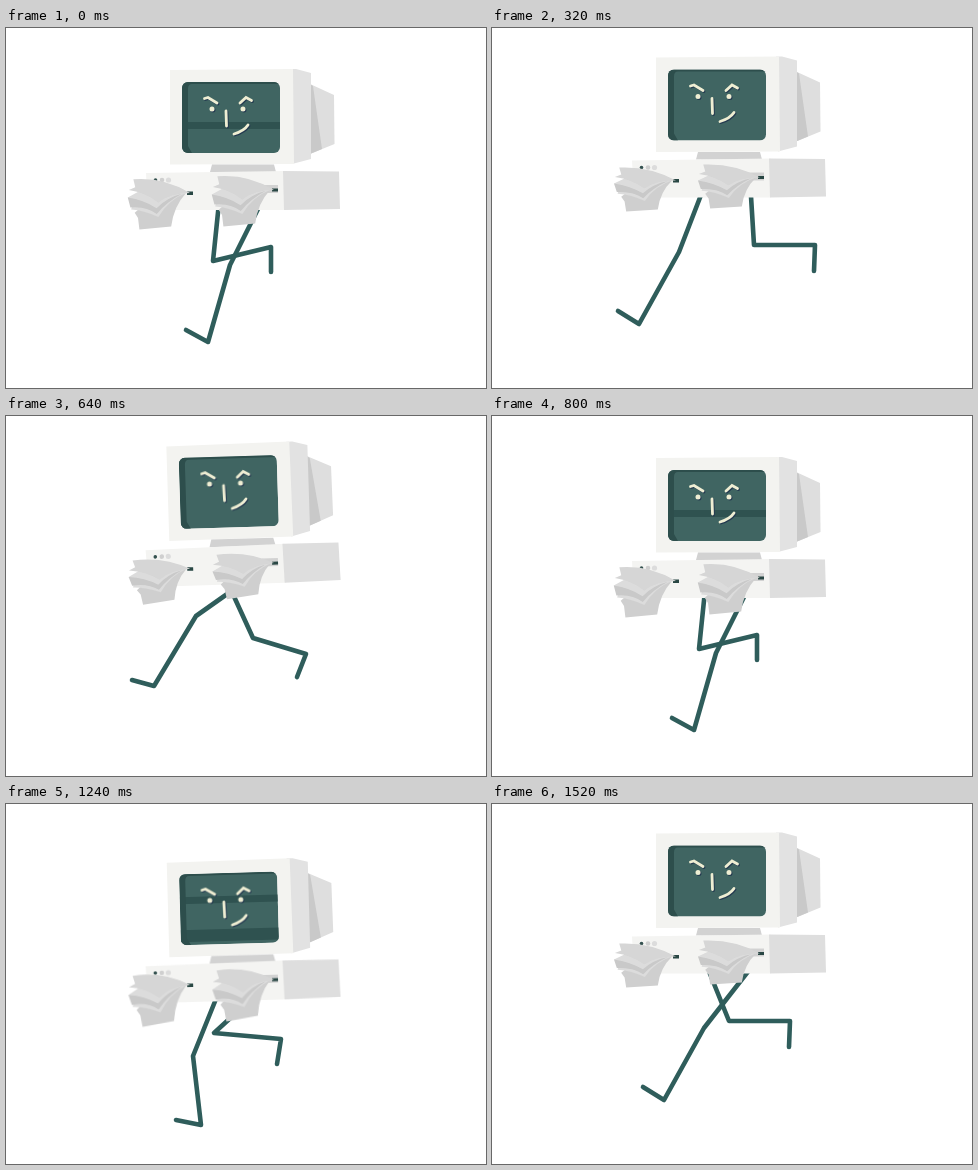
Animation of 480 by 360 pixels, one loop 1560 ms. Source, as an HTML page without scripts:

```html
<!DOCTYPE html>
<html lang="en">
<head>
<meta charset="utf-8">
<title>Running computer</title>
<style>
  @property --lift { syntax: "<length>"; inherits: true; initial-value: 0px; }
  @property --tilt { syntax: "<angle>"; inherits: true; initial-value: 0deg; }
  @property --flap { syntax: "<angle>"; inherits: true; initial-value: 8deg; }
  @property --spread { syntax: "<number>"; inherits: true; initial-value: 1; }
  @property --scan { syntax: "<length>"; inherits: true; initial-value: 0px; }
  @property --glow { syntax: "<number>"; inherits: true; initial-value: 0; }

  html, body { margin: 0; width: 100%; height: 100%; overflow: hidden; background: #fff; }
  svg { display: block; width: 100vw; height: 100vh; }

  /* An 800 ms stride, drawn at 25 fps and restarted after 1560 ms. */
  svg, .leg, .shadow { animation: 1560ms steps(2) -4ms infinite; }
  svg { animation-name: bob; }
  .leg { fill: none; stroke: #2f5d5b; stroke-width: 4.6; stroke-linecap: round; stroke-linejoin: round; }
  .far { animation-name: far-leg; }
  .near { animation-name: near-leg; }
  .shadow { fill: #4a9a8b; opacity: 0; }
  .shadow.left { animation-name: step-left; }
  .shadow.right { animation-name: step-right; }

  .body { transform-origin: 240px 160px; transform: translateY(var(--lift)) rotate(var(--tilt)); }
  .paper { transform: rotate(var(--flap)) scaleY(var(--spread)); }
  .bands { transform: translateY(var(--scan)); }
  .glow { opacity: var(--glow); }
  .face { fill: none; stroke: #efeed3; stroke-width: 2.8; stroke-linecap: round; filter: drop-shadow(1px 1px 0 #243a50); }

  @keyframes bob {
    0%, 25.641%, 51.282%, 76.923% { --lift: 0px; --tilt: 0deg; --flap: 8deg; --spread: .94; --scan: 94px; --glow: 0; animation-timing-function: step-end; }
    2.564%, 28.205%, 53.846%, 79.487% { --lift: 14.5px; --tilt: -1.6deg; --flap: 5deg; --spread: .97; --scan: 77px; --glow: 0; animation-timing-function: step-end; }
    5.128%, 30.769%, 56.41%, 82.051% { --lift: 31.5px; --tilt: -3.7deg; --flap: 3deg; --spread: 1; --scan: 69px; --glow: 0; }
    10.256%, 35.897%, 61.538%, 87.179% { --lift: -1px; --tilt: -5.5deg; --flap: 1deg; --spread: .92; --scan: 40px; --glow: 1; }
    15.385%, 41.026%, 66.667%, 92.308% { --lift: -14px; --tilt: -1.8deg; --flap: 5deg; --spread: .84; --scan: 9px; --glow: 0; }
    20.513%, 46.154%, 71.795%, 97.436%, 100% { --lift: -12.5px; --tilt: 0deg; --flap: 8deg; --spread: .82; --scan: 126px; --glow: 0; }
  }

  /* hip, knee, ankle, toe */
  @keyframes near-leg {
    0%, 51.282% { d: path("M214 165L207 233L265 219L265 244"); animation-timing-function: step-end; }
    2.564%, 53.846% { d: path("M214 180L185 228L250 234L246 259"); animation-timing-function: step-end; }
    5.128%, 56.41% { d: path("M214 197L177 208L219 245L210 268"); }
    10.256%, 61.538% { d: path("M214 174L159 207L158 267L136 279"); }
    15.385%, 66.667% { d: path("M214 152L165 198L133 264L112 260"); }
    20.513%, 71.795% { d: path("M214 154L187 224L147 296L126 283"); }
    25.641%, 76.923% { d: path("M214 165L200 237L177 314L155 302"); animation-timing-function: step-end; }
    28.205%, 79.487% { d: path("M214 185L187 252L195 321L170 316"); animation-timing-function: step-end; }
    30.769%, 82.051% { d: path("M212 208L190 265L218 322L193 323"); }
    35.897%, 87.179% { d: path("M216 165L237 237L284 284L266 302"); }
    41.026%, 92.308% { d: path("M214 150L247 222L300 238L291 261"); }
    46.154%, 97.436%, 100% { d: path("M214 160L237 217L298 217L297 243"); }
  }
  @keyframes far-leg {
    0%, 51.282% { d: path("M259 167L224 237L202 314L180 302"); animation-timing-function: step-end; }
    2.564%, 53.846% { d: path("M257 182L212 252L220 321L195 316"); animation-timing-function: step-end; }
    5.128%, 56.41% { d: path("M256 200L215 265L243 322L218 323"); }
    10.256%, 61.538% { d: path("M259 165L262 237L309 284L291 302"); }
    15.385%, 66.667% { d: path("M259 150L272 222L328 240L319 263"); }
    20.513%, 71.795% { d: path("M258 152L262 217L323 217L322 243"); }
    25.641%, 76.923% { d: path("M258 165L232 233L290 219L290 244"); animation-timing-function: step-end; }
    28.205%, 79.487% { d: path("M255 186L208 229L275 235L271 260"); animation-timing-function: step-end; }
    30.769%, 82.051% { d: path("M255 200L201 206L244 245L235 268"); }
    35.897%, 87.179% { d: path("M257 172L184 207L183 267L161 279"); }
    41.026%, 92.308% { d: path("M258 152L190 200L148 270L126 264"); }
    46.154%, 97.436%, 100% { d: path("M258 165L212 224L172 296L151 283"); }
  }
  @keyframes step-left {
    0%, 30.768%, 35.897%, 82.05%, 87.179%, 100% { opacity: 0; animation-timing-function: step-end; }
    30.769%, 82.051% { opacity: 1; }
  }
  @keyframes step-right {
    0%, 5.127%, 10.256%, 56.409%, 61.538%, 100% { opacity: 0; animation-timing-function: step-end; }
    5.128%, 56.41% { opacity: 1; }
  }
</style>
</head>
<body>
<svg viewBox="0 0 480 360">
  <defs>
    <clipPath id="screen"><rect x="176" y="54" width="98" height="71" rx="6"/></clipPath>
    <g id="sheets">
      <path fill="#cfcfcf" d="M-8 2Q-40 12-52 29L-48 34L-45 46L-14 38Q-14 16-4 1"/>
      <path fill="#dcdcdc" d="M-3 0Q-30-4-46 2L-61 14L-55 19L-56 26Q-42 25-28 30Q-20 10-3 0"/>
      <path fill="#c9c9c9" d="M-30 27Q-42 20-57 24L-61 14Q-45 14-31 21Q-22 8-8 2Q-22 13-30 27"/>
      <path fill="#d6d6d6" d="M0 0Q-28-13-58-6L-55 2L-61 6Q-44 6-30 15Q-20 3 0 0"/>
    </g>
  </defs>

  <ellipse class="shadow left" cx="192" cy="323.5" rx="27" ry="5.5"/>
  <ellipse class="shadow right" cx="217" cy="323.5" rx="27" ry="5.5"/>
  <path class="leg far" d="M259 167L224 237L202 314L180 302"/>
  <path class="leg near" d="M214 165L207 233L265 219L265 244"/>

  <g class="body">
    <!-- monitor -->
    <path fill="#dedede" d="M304 56L328 67L328.500 116L304 126"/>
    <path fill="#c9c9c9" d="M304 56L307 58L316 121L304 126"/>
    <path fill="#e2e2e2" d="M284 41L290 41L305 45V131L286 136"/>
    <path fill="#f3f3f0" d="M164 42L287 41L288 136L164 136.500"/>
    <g clip-path="url(#screen)">
      <rect x="176" y="54" width="98" height="71" fill="#406562"/>
      <rect class="glow" x="176" y="101" width="98" height="24" fill="#527572"/>
      <path class="bands" fill="#2f5250" d="M176 0h98v7h-98zM176 33h98v12h-98z"/>
      <path fill="#2d4e4c" d="M176 54H274V56H186Q182 56 182 61V118L186 125H176"/>
    </g>
    <g class="face">
      <path d="M198.500 70.500L202 69.500L211 75M234 75L240 69.500L245.500 72.500M220 83L220.500 98M228 106Q238 103 242 97"/>
      <path stroke-width="5" d="M206 81h.01M237 81h.01"/>
    </g>

    <!-- case -->
    <path class="glow" fill="#5aa193" d="M178 137H206V144H182"/>
    <path fill="#d2d2d2" d="M206 136.500H268L270 144H204"/>
    <path fill="#f4f4f2" d="M140 145L279 143V182H142"/>
    <path fill="#dedede" d="M277 143L333 143.500L334 181L278 182"/>
    <circle cx="149.500" cy="152" r="1.800" fill="#34514f"/>
    <circle cx="156" cy="152" r="2.300" fill="#cfcfcf"/>
    <circle cx="162.500" cy="152" r="2.600" fill="#dcdcdc"/>
    <path fill="#d2d2d2" d="M256 157H272V165H256"/>
    <path fill="#294744" d="M181 163.500H187V167H181zM266 160.500H272V163.500H266z"/>
    <g transform="translate(184 165)"><use class="paper" href="#sheets"/></g>
    <g transform="translate(268 162)"><use class="paper" href="#sheets"/></g>
  </g>
</svg>
</body>
</html>
```
